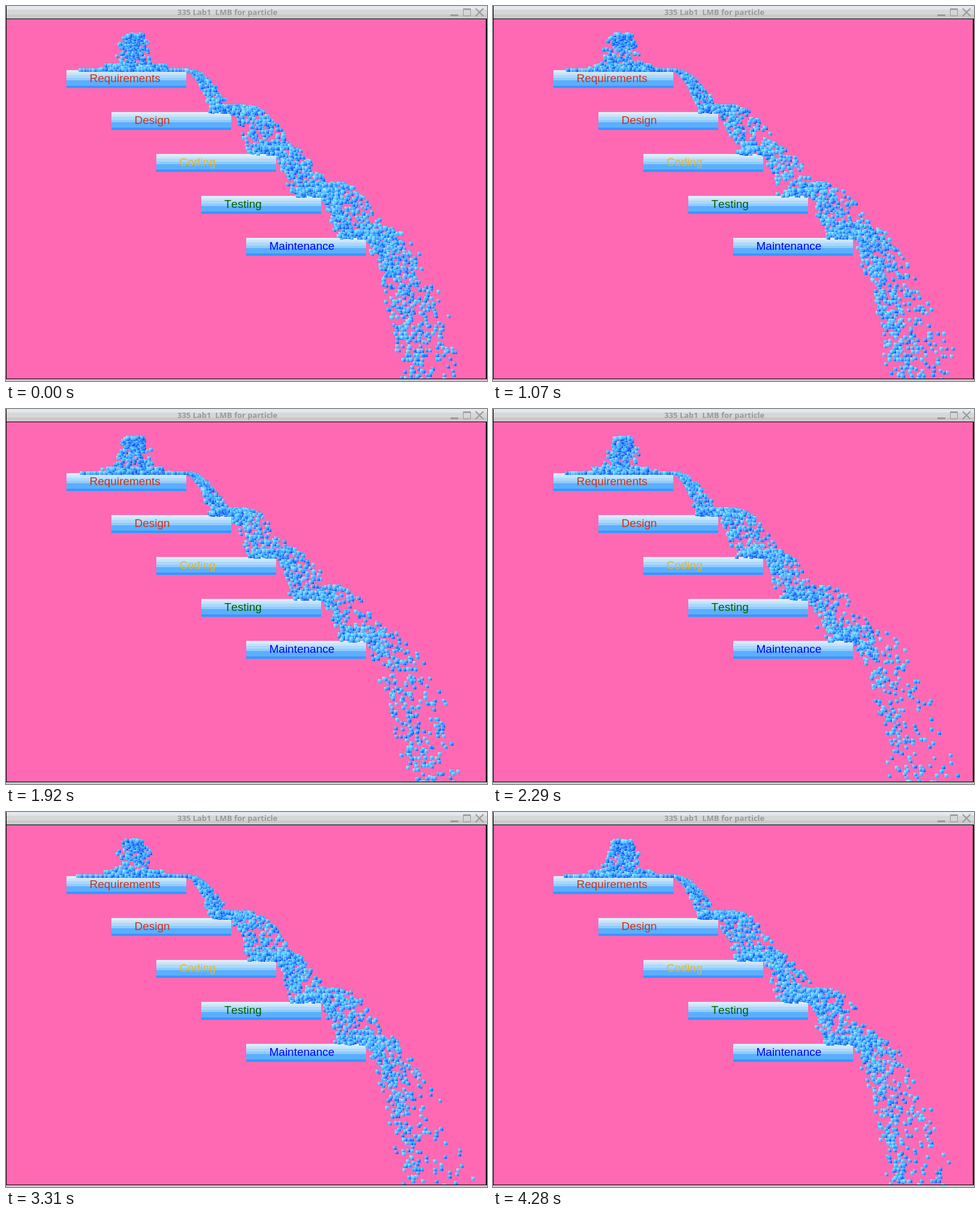
Write an HTML page with a canvas that moves like this. It is 803 px wide and 626 px high and loops after 4.38 s.

```html
<!DOCTYPE html>
<html lang="en">
<head>
<meta charset="utf-8">
<title>Waterfall model</title>
<style>
  html, body { margin: 0; width: 100%; height: 100%; overflow: hidden; }
  svg, canvas { position: absolute; left: 0; top: 0; display: block; }
  .title { font: bold 13px "Open Sans", sans-serif; fill: #999; white-space: pre; }
  .label { font: 19px "Liberation Sans", Arial, sans-serif; font-kerning: none; }
</style>
</head>
<body>
<svg id="scene" width="803" height="626" viewBox="0 0 803 626">
  <rect width="803" height="626" fill="#cacaca"/>
  <rect width="803" height="6" fill="#e4e8ec"/>
  <rect y="6" width="803" height="8" fill="#d5d7d9"/>
  <rect width="1" height="623" fill="#000"/>
  <rect y="21" width="803" height="602" fill="#000"/>
  <rect x="1" y="22" width="800" height="600" fill="#ff69b4"/>
  <text class="title" x="286" y="15">335 Lab1  LMB for particle</text>
  <g fill="none" stroke="#999" stroke-width="2">
    <path d="M742 15.5H755" stroke-width="3"/>
    <path d="M763.5 4.5H775.5V16.5H763.5Z" stroke-width="1"/>
    <path d="M763 5.5H776"/>
    <path d="M784 4L797 17M797 4L784 17"/>
  </g>
</svg>
<canvas id="water" width="803" height="626"></canvas>
<script>
const LOOP = 4380, STEP = 40.76, FRAMES = 106, TICKS = 4;
const GRAVITY = 0.1, BOUNCE = 0.38, SLIDE = 0.013, WARMUP = 640;
const RATE = 8, SIZE = 6;

const shelves = [
  ["Requirements", "#c8321e"],
  ["Design", "#c8321e"],
  ["Coding", "#e0b830"],
  ["Testing", "#006000"],
  ["Maintenance", "#0000ff"]
].map(([name, color], i) => ({ name, color, x: 101 + 75 * i, y: 107 + 70 * i }));

// offset, height, color
const bands = [
  [0, 4, "#dcedf6"], [4, 4, "#c8e4f8"], [8, 5, "#acd8fb"],
  [13, 4, "#90ccfd"], [17, 9, "#5caeff"], [26, 4, "#3399ff"]
];

const scene = document.getElementById("scene");
function add(tag, attrs, text = "") {
  const node = document.createElementNS("http://www.w3.org/2000/svg", tag);
  for (const key in attrs) node.setAttribute(key, attrs[key]);
  node.textContent = text;
  scene.append(node);
}
for (const s of shelves) {
  for (const [dy, height, fill] of bands) {
    add("rect", { x: s.x, y: s.y + dy, width: 200, height, fill });
  }
  add("text", { class: "label", x: s.x + 38.5, y: s.y + 20, fill: s.color }, s.name);
}

let seed = 335;
function random() {
  seed = (seed + 0x6d2b79f5) | 0;
  let n = Math.imul(seed ^ (seed >>> 15), 1 | seed);
  n = (n + Math.imul(n ^ (n >>> 7), 61 | n)) ^ n;
  return ((n ^ (n >>> 14)) >>> 0) / 4294967296;
}

// Pour strength over time: tick, amount
const pour = [
  [-WARMUP, 1.2], [-290, 1.2], [-240, 0.65], [-140, 0.6],
  [-70, 1], [200, 1], [250, 0.75], [440, 0.85]
];
function strength(tick) {
  const i = Math.max(1, pour.findIndex(p => p[0] >= tick));
  const [t0, a] = pour[i - 1], [t1, b] = pour[i];
  return a + (b - a) * (tick - t0) / (t1 - t0);
}

function spawn(tick) {
  return {
    x: 215 + 2 * Math.sin(tick / 30) + (random() - 0.5) * 26,
    y: 47 + random() * 3,
    vx: (random() - 0.5) * 1.7,
    vy: 0,
    tint: Math.floor(random() * 4)
  };
}

function move(p) {
  p.vy += GRAVITY;
  p.x += p.vx;
  p.y += p.vy;
  for (const s of shelves) {
    const hit = p.vy > 0 && p.x >= s.x && p.x <= s.x + 200 && p.y >= s.y && p.y < s.y + 30;
    if (!hit) continue;
    p.y = s.y;
    p.vy *= -BOUNCE;
    p.vx += SLIDE;
  }
}

// Run the water once and keep every picture, so drawing depends on time alone.
function simulate() {
  const pictures = [];
  let drops = [], pending = 0, gust = 1;
  for (let tick = -WARMUP; pictures.length < FRAMES; tick++) {
    if (tick >= 0 && tick % TICKS === 0) {
      pictures.push(drops.map(p => [Math.round(p.x) - 3, Math.round(p.y) - 3, p.tint]));
    }
    if (tick % 6 === 0) gust = 0.6 + 0.8 * random();
    for (pending += RATE * gust * strength(tick); pending >= 1; pending--) drops.push(spawn(tick));
    drops.forEach(move);
    drops = drops.filter(p => p.y < 630);
  }
  return pictures;
}

const sprites = [
  ["#b0f0ff", "#50bcff", "#1850f8"],
  ["#98e8ff", "#48b4ff", "#1040f0"],
  ["#c0f4ff", "#60c8ff", "#2888ff"],
  ["#88dcff", "#3ca0ff", "#0828e8"]
].map(colors => {
  const tile = document.createElement("canvas");
  tile.width = tile.height = SIZE;
  const c = tile.getContext("2d");
  const shade = c.createLinearGradient(0, 0, SIZE, SIZE);
  colors.forEach((color, i) => shade.addColorStop(i / 2, color));
  c.fillStyle = shade;
  c.fillRect(0, 0, SIZE, SIZE);
  return tile;
});

const ctx = document.getElementById("water").getContext("2d");
ctx.beginPath();
ctx.rect(1, 22, 800, 600);
ctx.clip();

const pictures = simulate();
const start = performance.now();
let shown = -1;
function draw() {
  const time = Math.max(0, performance.now() - start) % LOOP;
  const index = Math.min(FRAMES - 1, Math.floor(time / STEP));
  if (index !== shown) {
    shown = index;
    ctx.clearRect(0, 0, 803, 626);
    for (const [x, y, tint] of pictures[index]) ctx.drawImage(sprites[tint], x, y);
  }
  requestAnimationFrame(draw);
}
draw();
</script>
</body>
</html>
```
